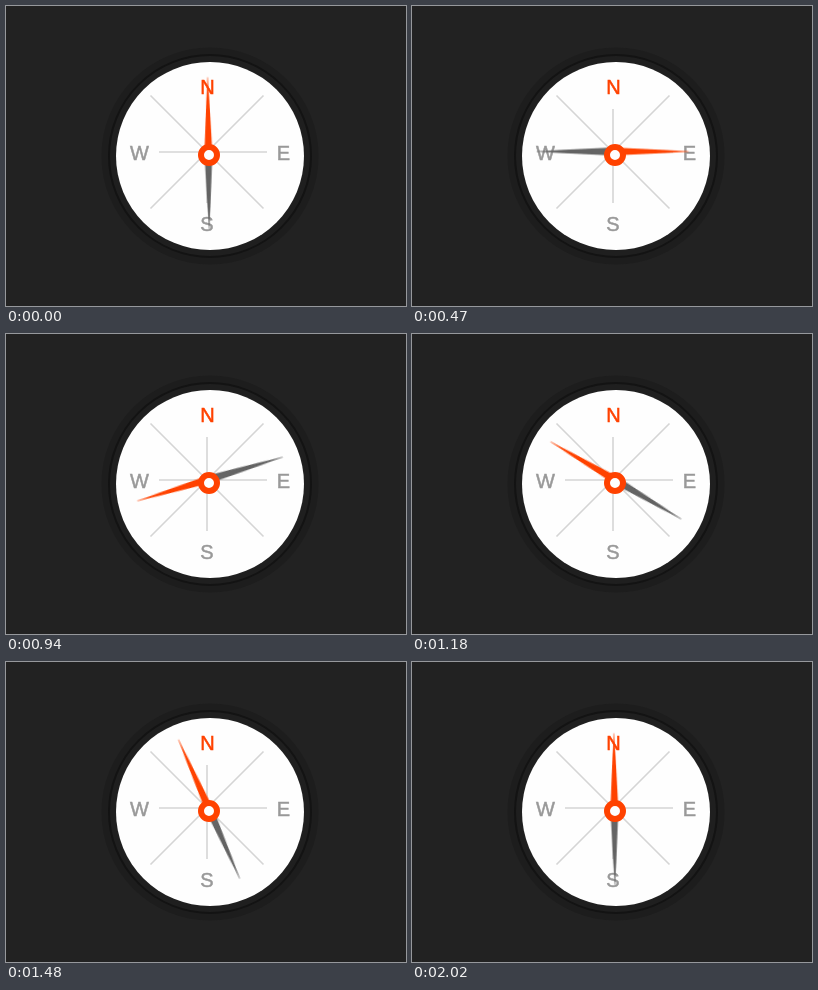
An HTML page that plays this animation: 400 px wide and 300 px high, repeating every 2080 ms.

```html
<!DOCTYPE html>
<html lang="en">
<head>
<meta charset="utf-8">
<title>Compass</title>
<style>
  html, body { margin: 0; width: 100%; height: 100%; overflow: hidden; background: #222; }
  svg { display: block; width: 400px; height: 300px; }
  text {
    font: 20px "Liberation Sans", Arial, sans-serif;
    text-anchor: middle;
    fill: #999;
    stroke: #999;
    stroke-width: .5;
  }
  .north { fill: #ff4200; stroke: #ff4200; }
</style>
</head>
<body>
<svg viewBox="0 0 400 300">
  <defs>
    <linearGradient id="red" gradientUnits="userSpaceOnUse" x1="0" y1="-74" x2="0" y2="0">
      <stop offset="0" stop-color="#ff4200" stop-opacity=".65"/>
      <stop offset=".3" stop-color="#ff4200"/>
    </linearGradient>
    <linearGradient id="gray" gradientUnits="userSpaceOnUse" x1="0" y1="78" x2="0" y2="0">
      <stop offset="0" stop-color="#666" stop-opacity=".7"/>
      <stop offset=".3" stop-color="#626262"/>
      <stop offset="1" stop-color="#666"/>
    </linearGradient>
  </defs>

  <circle cx="204" cy="150" r="108.5" fill="#1d1d1d"/>
  <circle cx="204" cy="150" r="101" fill="#1f1f1f" stroke="#131313" stroke-width="2"/>
  <circle cx="204" cy="150" r="94" fill="#fefefe"/>

  <path d="M201 103V197M153 146H261M144.5 89.5L257.5 202.5M257.5 89.5L144.5 202.5"
        fill="none" stroke="#d5d5d5" stroke-width="1.6"/>

  <text class="north" x="201.4" y="88">N</text>
  <text x="277.5" y="154">E</text>
  <text x="201" y="225">S</text>
  <text x="133.5" y="154">W</text>

  <g transform="translate(202.4 145.5)">
    <g id="needle">
      <path d="M-4 1.7L-.4 -74.3H.4L4 1.7Z" fill="url(#red)"/>
      <path d="M-4 1.7L-.4 77.7H.4L4 1.7Z" fill="url(#gray)"/>
    </g>
  </g>
  <circle cx="203" cy="149" r="8" fill="#fefefe" stroke="#ff4200" stroke-width="6"/>
</svg>
<script>
  const LOOP = 2080, TURN = 2000, DELAY = 110, STEPS = 35;

  // Steps last 60 ms, except two of 50 ms.
  const stepTime = i => i * 60 - (i > 4 ? 10 : 0) - (i > 12 ? 10 : 0);

  const bezier = (a, b, u) => 3 * a * u * (1 - u) ** 2 + 3 * b * u * u * (1 - u) + u ** 3;

  // The standard CSS "ease" curve, solved by bisection.
  function ease(x) {
    let lo = 0, hi = 1;
    for (let i = 0; i < 30; i++) {
      const mid = (lo + hi) / 2;
      if (bezier(.25, .25, mid) < x) lo = mid; else hi = mid;
    }
    return bezier(.1, 1, lo);
  }

  const angle = t => 360 * ease(((t - DELAY + TURN) % TURN) / TURN);

  const frames = Array.from({ length: STEPS }, (_, i) => ({
    offset: stepTime(i) / LOOP,
    transform: `rotate(${angle(stepTime(i))}deg)`,
    easing: "steps(1, end)"
  }));
  frames.push({ ...frames[0], offset: 1 });

  document.getElementById("needle").animate(frames, { duration: LOOP, iterations: Infinity });
</script>
</body>
</html>
```
